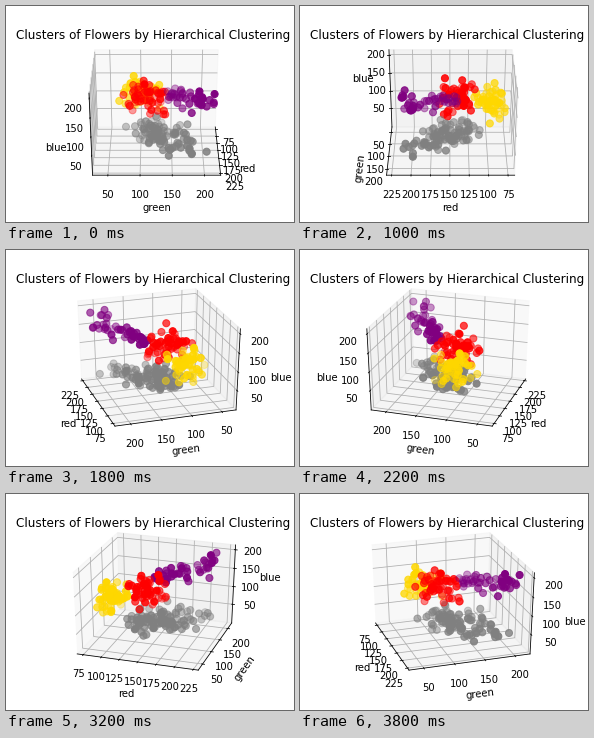
Recreate the animation shown at these times as a matplotlib script. Size 288x216 px, loop 4000 ms.

```python
import matplotlib.pyplot as plt
import numpy as np
from matplotlib.animation import FuncAnimation

FRAMES = 20
CENTER = np.array([149, 125.7, 104.5])  # red, green, blue
SPAN = np.array([158.5, 191, 208])
LIMIT = 0.4545

rng = np.random.default_rng(12)


def cluster(n, start, end, spread, flare=0.0):
    """Scatter n points of the unit cube along a segment, denser near its start."""
    start, end = np.array(start), np.array(end)
    t = rng.beta(1.6, 2.2, (n, 1))
    wobble = np.clip(rng.normal(size=(n, 3)), -2.2, 2.2) * spread
    pts = start + t * (end - start) + wobble * (1 + flare * (t - 0.5))
    return CENTER + SPAN * np.clip(pts, -LIMIT, LIMIT)


fig = plt.figure(figsize=(4, 3), dpi=72)
fig.subplots_adjust(left=0.125, right=0.9, bottom=0.125, top=0.88)
ax = fig.add_subplot(projection="3d")

# Let the unit cube stretch with the full axes rectangle.
ax.apply_aspect = lambda position=None: None
ax.set_box_aspect((1, 1, 1), zoom=np.sqrt(3) / 1.8294640721620434)

clusters = {
    "gray": cluster(97, (-0.18, -0.17, -0.26), (0.32, 0.3, -0.32),
                    (0.1, 0.08, 0.065)),
    "gold": cluster(50, (-0.3, -0.22, 0.17), (-0.4, -0.06, -0.13),
                    (0.055, 0.08, 0.06)),
    "red": cluster(52, (-0.11, -0.11, 0.24), (0.04, -0.04, -0.02),
                   (0.075, 0.08, 0.08)),
    "purple": cluster(44, (-0.1, 0.05, 0.18), (0.47, 0.47, 0.36),
                      (0.05, 0.05, 0.05), flare=1.5),
}
for color, pts in clusters.items():
    ax.scatter(*pts.T, s=50, c=color)

low, high = CENTER - SPAN * 25 / 48, CENTER + SPAN * 25 / 48
ax.set(xlim=(low[0], high[0]), ylim=(low[1], high[1]), zlim=(low[2], high[2]),
       xticks=range(75, 226, 25), yticks=range(50, 201, 50),
       zticks=range(50, 201, 50),
       xlabel="red", ylabel="green", zlabel="blue")
ax.set_title("Clusters of Flowers by Hierarchical Clustering", y=1)
ax.title.set_y(0.92)


def update(i):
    turn = 2 * np.pi * i / FRAMES
    # A tiny nudge settles which edges carry the axes in head-on views.
    nudge = 0.001 * (np.cos(turn) - np.sin(turn))
    ax.view_init(elev=30, azim=np.degrees(turn) + nudge)
    return []


anim = FuncAnimation(fig, update, frames=FRAMES, interval=200,
                     init_func=lambda: [], repeat=True, repeat_delay=0)
plt.show()
```
